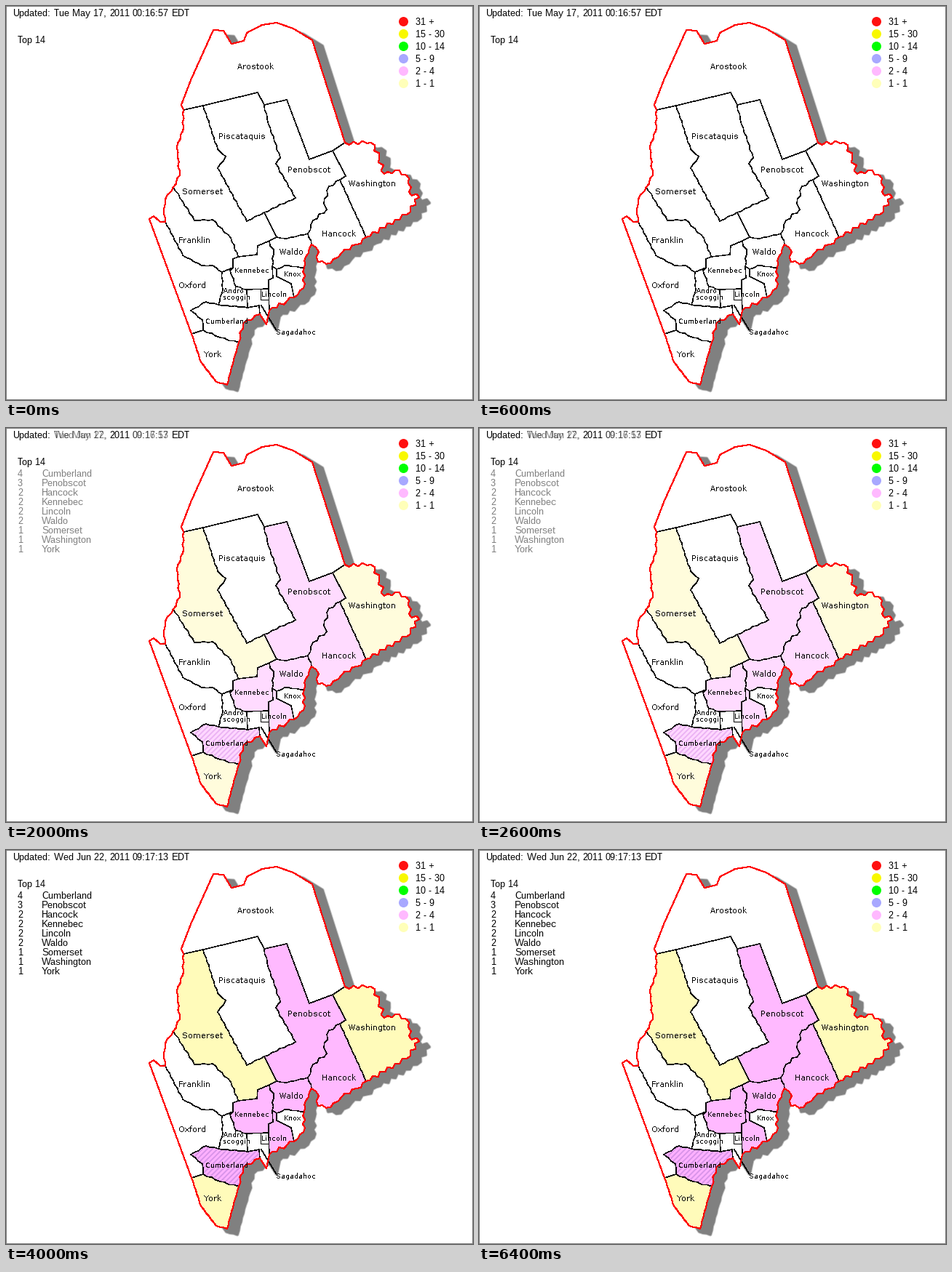
Write a matplotlib script that moves like this. It is 642 px wide and 542 px high and loops after 8000 ms.

```python
import math
import random

import matplotlib.pyplot as plt
from matplotlib.animation import FuncAnimation
from matplotlib.patches import Circle, Polygon, Rectangle

W, H, DPI = 642, 542, 100
PX = 72 / DPI
FADE_STEPS = 4
PINK, CREAM = "#ffb9ff", "#fffbba"

plt.rcParams["text.hinting"] = "native"
plt.rcParams["text.hinting_factor"] = 1

# Points where borders meet
NODES = dict(
    a=(244, 143), b=(271, 137), c=(355, 136), d=(449, 199), e=(466, 188), f=(459, 239),
    g=(495, 318), h=(415, 313), i=(420, 328), j=(372, 318), k=(355, 284), l=(362, 323),
    m=(319, 345), n=(230, 249), o=(219, 297), p=(297, 366), q=(312, 360), r=(331, 390),
    s=(361, 389), t=(366, 358), u=(372, 362), v=(410, 360), w=(396, 401), x=(362, 419),
    y=(349, 424), z=(332, 415), A=(292, 411), B=(271, 446), C=(255, 451), D=(320, 463))

# Borders between two nodes: roughness, then the main bends on the way
INLAND = dict(
    ab=(0,), bc=(0, (346, 119)), cd=(0, (386, 129), (417, 211)), de=(0,),
    df=(0, (467, 234)), fg=(0.5,), jk=(0,), lj=(0,), hi=(1,), tu=(0,), pq=(0,), rs=(0,),
    sx=(0,), Az=(1,), rz=(0,), CB=(0,), pA=(1, (298, 390)),
    fh=(2, (444, 248), (437, 272), (441, 280), (422, 295)),
    bk=(1, (291, 197), (302, 207), (291, 223), (331, 296)),
    ck=(1, (359, 156), (377, 209), (371, 217), (398, 264)),
    jh=(1, (386, 320)), nm=(1, (259, 295), (284, 294), (309, 319)),
    ml=(0, (345, 342), (346, 330)), lt=(2, (368, 342)), uv=(1, (383, 357)),
    uw=(0, (372, 372), (392, 382)), ts=(0, (367, 374), (361, 377)), mq=(0, (312, 348)),
    op=(1, (243, 343), (269, 357), (284, 357)), qr=(1, (308, 364), (316, 386)),
    zy=(0, (348, 412)), AB=(1, (275, 407), (254, 419), (270, 432)), BD=(1, (294, 456)))
COAST = dict(
    Co=(0, (197, 293), (203, 289), (212, 297)), on=(1, (217, 280), (219, 266)),
    na=(1.5, (239, 233), (235, 195), (243, 172)),
    ae=(0, (241, 136), (254, 102), (285, 33), (299, 34), (310, 52), (327, 48), (331, 37),
        (352, 26), (372, 23), (395, 31), (421, 47)),
    eg=(3, (502, 188), (513, 209), (520, 231), (541, 226), (554, 237), (554, 256),
        (568, 263), (551, 287)),
    gi=(3, (482, 328), (461, 340), (446, 354), (429, 352), (430, 338)),
    iv=(1.5, (412, 345)), vw=(2, (409, 388)), wx=(3, (386, 406)), xy=(0, (358, 438)),
    yD=(2, (326, 437)), DC=(0.5, (315, 480), (304, 521), (289, 517), (268, 490)))

OUTLINE = "onaegivwxyDC"
COUNTIES = [("cdfhjk", PINK), ("fgih", PINK), ("jhivutl", PINK), ("mltsrq", PINK),
            ("tuwxs", PINK), ("abkjlmn", CREAM), ("egfd", CREAM), ("BDC", CREAM)]
TOP_COUNTY = "AzyDB"

LABELS = [("Arostook", 318, 87), ("Piscataquis", 292, 183), ("Penobscot", 387, 229),
          ("Washington", 471, 248), ("Somerset", 242, 259), ("Hancock", 434, 317),
          ("Franklin", 237, 326), ("Waldo", 376, 342), ("Oxford", 237, 388),
          ("York", 272, 483)]
SMALL_LABELS = [("Kennebec", 314, 367), ("Knox", 382, 372), ("Andro", 299, 395),
                ("scoggin", 298, 404), ("Lincoln", 351, 400), ("Cumberland", 274, 437),
                ("Sagadahoc", 371, 452)]
LEGEND = [("31 +", "#ff1010"), ("15 - 30", "#f8f800"), ("10 - 14", "#00ff00"),
          ("5 - 9", "#a8a8ff"), ("2 - 4", PINK), ("1 - 1", "#ffffb9")]
COUNTS = [(4, "Cumberland"), (3, "Penobscot"), (2, "Hancock"), (2, "Kennebec"),
          (2, "Lincoln"), (2, "Waldo"), (1, "Somerset"), (1, "Washington"), (1, "York")]

fig = plt.figure(figsize=(W / DPI, H / DPI), dpi=DPI, facecolor="white")
ax = fig.add_axes([0, 0, 1, 1])
ax.set(xlim=(0, W), ylim=(H, 0))
ax.axis("off")
rng = random.Random(14)
fading_in, fading_out = [], []


def roughen(points, amp, step=6):
    """Add zigzag bends of random depth along a polyline."""
    path, side = [points[0]], 1
    for (x0, y0), (x1, y1) in zip(points, points[1:]):
        length = math.dist((x0, y0), (x1, y1))
        n = max(1, round(length / step)) if amp else 1
        for k in range(1, n):
            off = side * amp * rng.uniform(0.3, 1)
            side = -side
            path.append((x0 + (x1 - x0) * k / n - (y1 - y0) / length * off,
                         y0 + (y1 - y0) * k / n + (x1 - x0) / length * off))
        path.append((x1, y1))
    return path


EDGES = {key: roughen([NODES[key[0]], *bends, NODES[key[1]]], amp)
         for key, (amp, *bends) in (INLAND | COAST).items()}


def ring(nodes):
    """Closed path along the edges that link the given nodes."""
    points = []
    for start, end in zip(nodes, nodes[1:] + nodes[0]):
        points += EDGES.get(start + end) or EDGES[end + start][::-1]
    return points


def fill(points, color, **kw):
    return ax.add_patch(Polygon(points, fc=color, **{"ec": "none", **kw}))


def stroke(points, color, width):
    xs, ys = zip(*points)
    return ax.plot(xs, ys, color=color, lw=width * PX, antialiased=False,
                   solid_joinstyle="round")[0]


def write(x, y, s, size=13, font="Liberation Sans", **kw):
    return ax.text(x, y, s, fontsize=size * PX, family=font, va="baseline", **kw)


def draw_shadow(dx=14, dy=8):
    points = [(x + dx, y + dy) for x, y in ring(OUTLINE)]
    for width, gray in ((5, "#c0c0c0"), (3, "#808080")):
        fill(points, "#808080", ec=gray, lw=width * PX, joinstyle="round")


def draw_counts():
    fading_in.extend(fill(ring(nodes), color) for nodes, color in COUNTIES)
    top = fill(ring(TOP_COUNTY), "#ffb0ff")
    fading_in.append(top)
    for x in range(190, 360, 7):
        line = stroke([(x, 470), (x + 70, 400)], "#dc98ec", 0.5)
        line.set_clip_path(top)
        fading_in.append(line)


def draw_map():
    draw_shadow()
    fill(ring(OUTLINE), "white")
    draw_counts()
    for key in INLAND:
        stroke(EDGES[key], "black", 0.5)
    stroke([(350, 389), (350, 404), (361, 404)], "black", 0.5)
    stroke([(351, 412), (371, 445)], "black", 0.5)
    stroke(ring(OUTLINE), "red", 1)
    for labels, size in ((LABELS, 10.8), (SMALL_LABELS, 9)):
        for name, x, y in labels:
            write(x, y, name, size, "DejaVu Sans", antialiased=False)


def draw_header():
    for x, s in ((9, "Updated:"), (142, "2011"), (228, "EDT")):
        write(x, 14, s)
    for x, first, last in ((66, "Tue May 17,", "Wed Jun 22,"),
                           (174, "00:16:57", "09:17:13")):
        fading_out.append(write(x, 14, first))
        fading_in.append(write(x, 14, last))


def draw_lists():
    write(16, 51, "Top 14")
    for i, (count, name) in enumerate(COUNTS):
        y = 67 + 13 * i
        fading_in.append(write(16, y, str(count)))
        fading_in.append(write(49, y, name))
    for i, (name, color) in enumerate(LEGEND):
        y = 21 + 17 * i
        ax.add_patch(Circle((546.5, y + 0.5), 6.5, fc=color, ec="none"))
        write(563, y + 5, name)


def update(i):
    t = min(i / FADE_STEPS, 1)
    for artist in fading_in:
        artist.set_alpha(t)
    for artist in fading_out:
        artist.set_alpha(1 - t)
    return fading_in + fading_out


draw_map()
draw_header()
draw_lists()
ax.add_patch(Rectangle((0, 0), W, H, fc="none", ec="#808080", lw=2 * PX))

anim = FuncAnimation(fig, update, frames=8, interval=1000, repeat=True, repeat_delay=0)
plt.show()
```
